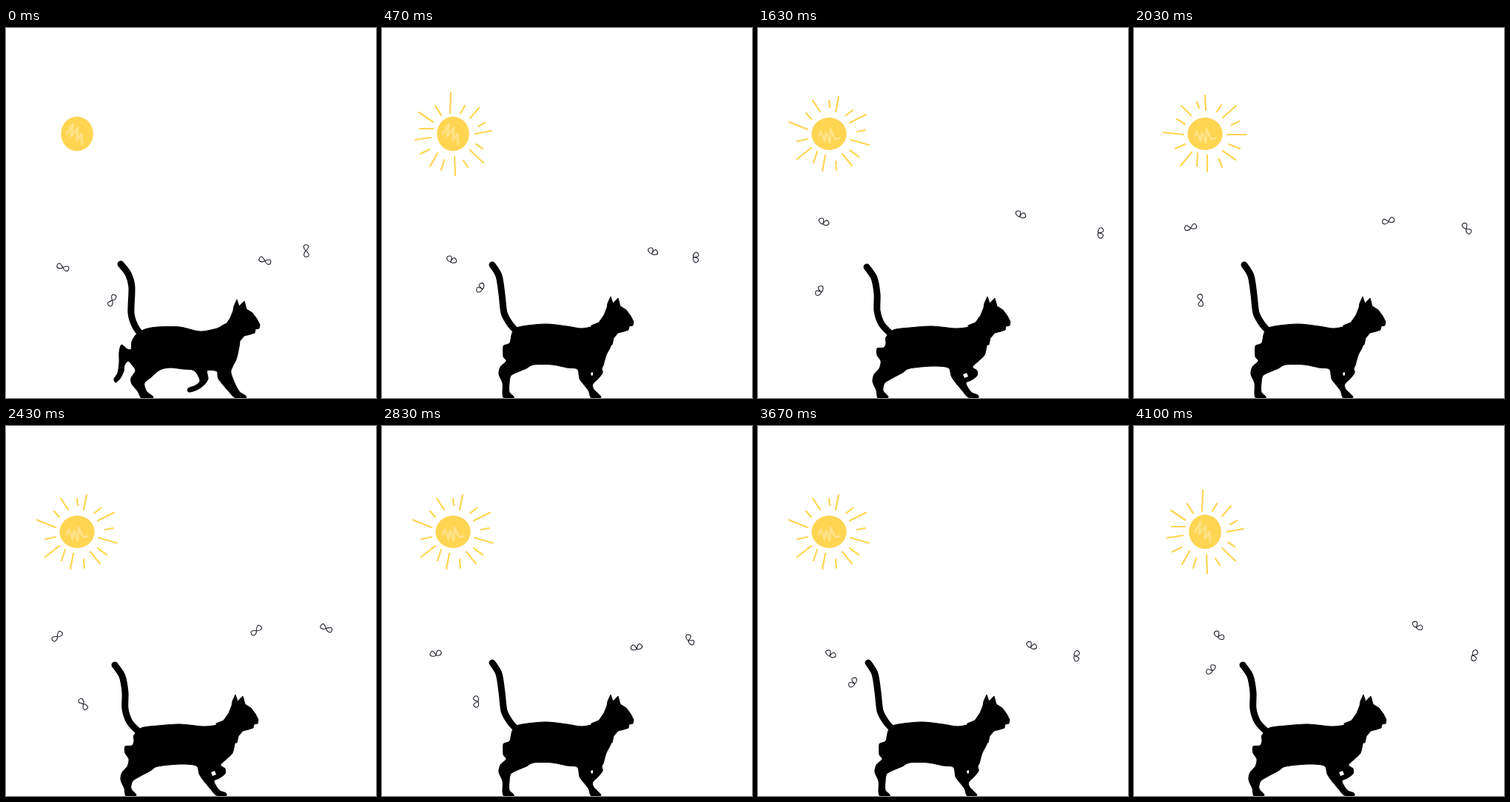
Animation of 500x500 px, one loop 4130 ms. Source, as an HTML page:

```html
<!DOCTYPE html>
<html lang="en">
<head>
<meta charset="utf-8">
<title>Walking cat</title>
<style>
  html, body { margin: 0; width: 100%; height: 100%; overflow: hidden; background: #fff; }
  svg { display: block; width: 100vw; height: 100vh; }
</style>
</head>
<body>
<svg viewBox="0 0 500 500">
  <g fill="none" stroke="#ffd552" stroke-linecap="round" stroke-linejoin="round">
    <ellipse id="disc" cx="96" cy="143" fill="#ffd552" stroke="none"/>
    <path id="scribble" stroke="#ffe186" stroke-width="3"/>
    <path id="rays" stroke-width="2.2"/>
  </g>
  <g id="bugs" fill="#fff" stroke="#22222f" stroke-width="1.1" stroke-linejoin="round"></g>
  <g stroke="#000" stroke-linejoin="round" stroke-linecap="round">
    <path id="tail" fill="none" stroke-width="9"/>
    <path id="body"/>
    <path id="head" d="M286 406L296 402 303 392 307 382 308 376 312 367 315 376 322 369 325 380 333 385 339 393 343 401 342 406 337 407 336 412 330 414 322 416 316 423 314 432 300 432Z"/>
    <path id="gap" fill="#fff" stroke="none"/>
  </g>
</svg>
<script>
const LOOP = 4130;
const $ = id => document.getElementById(id);
const set = (el, attrs) => { for (const k in attrs) el.setAttribute(k, attrs[k]); };
const parse = s => s.trim().split(/\s+/).map(p => p.split(',').map(Number));

// Smooth curve through points.
function curve(text, closed) {
  const pts = parse(text), n = pts.length;
  const at = i => closed ? pts[(i + n) % n] : pts[Math.max(0, Math.min(n - 1, i))];
  let d = 'M' + pts[0];
  for (let i = 0; i < (closed ? n : n - 1); i++) {
    const [a, b, c, e] = [at(i - 1), at(i), at(i + 1), at(i + 2)];
    d += `C${[0, 1].map(k => b[k] + (c[k] - a[k]) / 7)} ${[0, 1].map(k => c[k] - (e[k] - b[k]) / 7)} ${c}`;
  }
  return closed ? d + 'Z' : d;
}

const pose = (head, tail, body, gap = '') =>
  ({ head: `translate(${head})`, tail: curve(tail), body: curve(body, true), gap });

const lift = pose([0, 0],
  '155,319 165,332 170,350 169,385 174,402 182,414',
  `176,414 188,407 205,404 235,404 262,410 285,406 300,400 315,420 314,436 311,448 306,458 304,466
   310,482 316,492 324,497 323,501 310,500 300,490 287,474 285,464 272,463 273,474 268,482 258,489
   247,492 246,487 256,483 262,477 258,467 252,462 240,461 222,459 208,462 196,472 187,480 190,491
   199,499 184,501 178,491 170,481 169,473 175,463 170,455 165,450 160,456 159,464 154,474 148,479
   146,474 151,466 153,452 153,438 156,428 164,434 169,434 170,424`);
const passNear = pose([-2, -4],
  '147,323 157,338 161,360 161,382 167,400 180,414',
  `173,418 183,408 205,405 235,403 268,406 290,403 302,398 313,414 309,430 306,442 298,450 290,458
   296,463 296,470 288,476 281,480 288,492 297,496 297,500 284,499 276,490 266,478 261,470 257,459
   235,457 205,460 195,466 180,474 171,480 169,490 176,498 172,501 162,500 160,490 155,478 157,468
   164,460 166,450 161,442 161,433 170,432 173,426`,
  'M277 468L282 466 284 471 279 473Z');
const passFar = pose([-3, -4],
  '149,320 158,335 162,360 165,385 173,400 182,410',
  `176,412 185,404 220,400 250,403 270,406 290,402 302,398 312,414 309,430 303,442 299,456 297,460
   298,466 292,474 285,481 286,488 296,499 283,500 279,490 272,481 267,474 264,461 250,459 230,455
   205,455 195,460 183,465 174,470 172,480 172,492 178,498 176,501 165,500 163,494 163,480 158,468
   160,458 168,450 164,444 164,430 168,428 173,425`,
  'M282 466l3 -1 0 4 -2 1Z');
const reach = pose([1, -3],
  '150,320 161,334 167,352 170,382 176,400 186,412',
  `182,412 195,405 225,402 265,407 290,404 303,398 316,418 313,432 310,445 312,460 318,470 328,478
   330,484 322,484 308,476 296,462 285,460 278,463 270,480 270,492 274,498 262,500 258,490 258,475
   252,459 230,458 212,462 206,472 204,482 210,490 206,494 196,488 192,478 186,467 175,468 160,478
   150,486 146,493 150,500 136,500 134,490 142,478 150,464 158,450 165,436 172,424`);
const stride = pose([3, -3],
  '154,319 166,330 173,350 177,378 183,396 192,408',
  `188,406 200,402 225,401 265,406 290,403 303,398 318,418 316,430 312,442 315,456 316,468 322,478
   334,491 348,498 347,501 330,500 318,490 306,478 295,462 288,458 260,459 258,466 253,478 247,484
   232,488 231,484 241,480 244,474 242,460 230,460 215,468 209,478 213,490 221,497 219,501 208,499
   200,490 192,478 193,465 197,456 180,457 160,458 145,465 130,473 115,479 106,478 107,472 118,470
   132,460 148,446 158,440 165,428 178,416`);
const WALK = [lift, passNear, reach, stride, lift, passFar, reach, stride];

function drawCat(t) {
  const p = WALK[Math.floor((t + 70) / 100) % 8];
  set($('head'), { transform: p.head });
  set($('tail'), { d: p.tail });
  set($('body'), { d: p.body });
  set($('gap'), { d: p.gap });
}

const rays = text => text.trim().split(/\s+/).map(s => 'M' + s.replace('>', 'L')).join('');
const TALL = { rx: 21.8, ry: 23.2, scribble: 'M82 143L90 130 88 146 97 135 96 152 102 143 103 157' };
const WIDE = { rx: 23.6, ry: 22, scribble: 'M82 146L85 140 90 153 92 141 97 155 98 137 104 150 110 149' };
const SUN = {
  bare: { ...TALL, rays: '' },
  first: { ...TALL, rays: rays(`93,87>92,115 72,105>80,118 112,105>106,115 131,108>119,122
    50,114>69,127 139,128>130,133 51,136>69,136 45,151>66,148 148,139>126,143 52,170>64,164
    127,157>136,163 75,169>65,187 84,178>80,192 98,174>99,199 110,179>116,188 119,165>137,182`) },
  second: { ...WIDE, rays: rays(`109,93>105,113 96,98>97,107 74,98>84,113 65,115>72,123
    42,127>67,137 128,111>119,118 146,117>124,128 145,138>134,140 125,151>150,158 67,150>53,153
    72,162>53,177 80,167>75,182 91,172>87,193 105,180>106,192 114,170>127,186 124,165>136,174`) },
  third: { ...WIDE, rays: rays(`96,91>97,111 85,100>88,108 64,105>77,118 118,104>112,113
    138,105>120,121 58,123>69,130 142,126>132,131 40,141>67,144 126,144>152,144 69,157>56,163
    128,157>143,163 78,168>63,186 86,169>85,187 99,172>99,194 115,177>119,188 120,166>137,178`) }
};

function drawSun(t) {
  const u = (t - 305) % 933;
  const s = SUN[t < 305 ? 'bare' : u < 245 ? 'first' : u < 661 ? 'second' : 'third'];
  set($('disc'), { rx: s.rx, ry: s.ry });
  set($('scribble'), { d: s.scribble });
  set($('rays'), { d: s.rays });
}

// Flight keys repeat every FLIGHT ms.
const FLIGHT = 3100;
const TIMES = [0, 130, 470, 1000, 1070, 1630, 2430];
const TURN = [20, 20, 25, 36, 36, 25, -42];
const BUGS = [
  { turn: 0, path: '77,323 78,322 94,313 115,283 114,281 89,262 69,284' },
  { turn: -82, path: '143,368 142,367 133,351 104,329 102,331 83,355 104,376' },
  { turn: 0, path: '350,314 351,313 366,302 383,270 381,268 355,252 338,276' },
  { turn: 68, path: '406,301 407,301 424,310 460,310 461,308 463,277 433,273' }
].map(({ turn, path }) => {
  const pts = parse(path);
  const el = document.createElementNS('http://www.w3.org/2000/svg', 'g');
  const wing = 'M0 0C-4 -2 -4.5 -7 -2 -8C0 -8.6 3 -8 3 -6C3 -4 1.5 -2 0 0Z';
  el.innerHTML = `<path d="${wing}"/><path d="${wing}"/>`;
  $('bugs').append(el);
  return { el, turn, x: pts.map(p => p[0]), y: pts.map(p => p[1]) };
});

function track(values, t) {
  const n = TIMES.length;
  const time = i => TIMES[(i + n) % n] + FLIGHT * Math.floor(i / n);
  const val = i => values[(i + n) % n];
  const slope = i => (val(i + 1) - val(i - 1)) / (time(i + 1) - time(i - 1));
  let i = n - 1;
  while (TIMES[i] > t) i--;
  const span = time(i + 1) - time(i), u = (t - time(i)) / span, v = 1 - u;
  return val(i) * v * v * (1 + 2 * u) + val(i + 1) * u * u * (3 - 2 * u)
    + span * u * v * (slope(i) * v - slope(i + 1) * u);
}

function drawBugs(t) {
  const u = t % FLIGHT;
  const spread = 61 + 23 * Math.cos(t / 106 * 2 * Math.PI);
  const drop = 4.5 * Math.cos(spread * Math.PI / 180);
  const turn = track(TURN, u);
  for (const b of BUGS) {
    set(b.el, { transform: `translate(${track(b.x, u)} ${track(b.y, u)}) rotate(${turn + b.turn}) translate(0 ${drop})` });
    set(b.el.children[0], { transform: `rotate(${-spread})` });
    set(b.el.children[1], { transform: `rotate(${spread}) scale(-1 1)` });
  }
}

function draw(t) {
  drawSun(t);
  drawBugs(t);
  drawCat(t);
}

const start = performance.now();
function tick(now) {
  draw(Math.max(0, now - start) % LOOP);
  requestAnimationFrame(tick);
}
draw(0);
requestAnimationFrame(tick);
</script>
</body>
</html>
```
